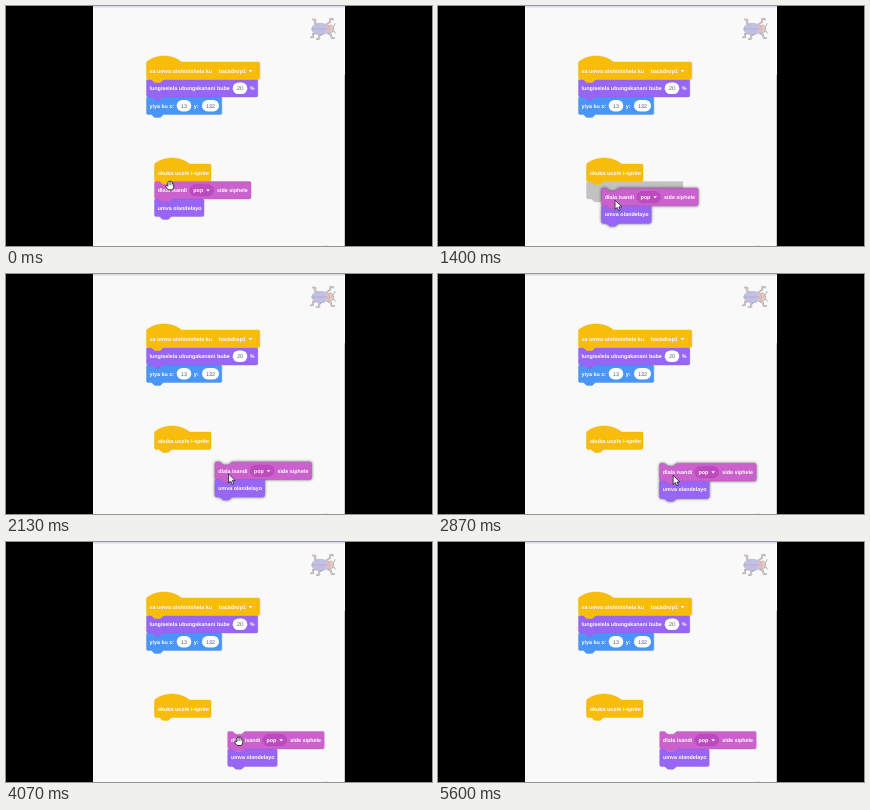
These frames come from a looping animation (426 by 240 pixels, 5670 ms). An HTML page:

```html
<!DOCTYPE html>
<html lang="xh">
<head>
<meta charset="utf-8">
<title>Block drag</title>
<style>
html, body { margin: 0; width: 100%; height: 100%; overflow: hidden; background: #000; }
svg { display: block; width: 100vw; height: 100vh; }
text { font: bold 5.4px "Liberation Sans", Arial, sans-serif; fill: #fff; text-rendering: geometricPrecision; }
.lift { filter: drop-shadow(0 0 1.8px rgba(0, 0, 0, .65)); }
</style>
</head>
<body>
<svg id="stage" viewBox="0 0 426 240">
  <defs>
    <pattern id="dots" x="87" width="14.6" height="14.6" patternUnits="userSpaceOnUse">
      <rect x="7" y="7" width="1" height="1" fill="#f1f1f1"/>
    </pattern>
  </defs>
  <rect width="426" height="240"/>
  <path d="M87 0H339V240H87Z" fill="#f9f9f9"/>
  <path d="M87 0H339V240H87Z" fill="url(#dots)"/>
  <path d="M87 .7H339" stroke="#d8daf0" stroke-width="1.4"/>
  <path d="M338.5 69V240" stroke="#cbcad4"/>
  <path d="M317 240q3-1.6 6 0" fill="#dcdce4"/>

  <g id="beetle" opacity=".6" stroke-linecap="round" stroke-linejoin="round">
    <g id="legs" fill="none">
      <path id="leg" d="M312 19l-3-2 .5-3-2.5-.5M321 18l3-2 .3-3 2.7.3M310 27l-3 1 .2 3-2.2.4M316 28l-3 2 .3 2.6-2.3.4M322 27.5l3 1.3.5 3 2.5.2" stroke="#77727f" stroke-width="1.9"/>
      <use href="#leg"/>
      <path d="M326 21l2.5-1.5.5-2M326 25l2.5.6.8 1.6" stroke="#77727f" stroke-width=".9"/>
    </g>
    <ellipse cx="324" cy="23" rx="3.6" ry="4" fill="#d9a58e" stroke="#777" stroke-width=".6"/>
    <ellipse cx="314.5" cy="23" rx="8.7" ry="5.6" fill="#a29bd9" stroke="#75719a" stroke-width=".7"/>
    <path d="M318.5 18.2q4.2 1 4.7 4.8t-4.7 4.8q2.3-4.8 0-9.6Z" fill="#c796b8"/>
    <path d="M306 23h15" stroke="#716a9c" stroke-width=".6"/>
  </g>

  <g id="blocks"></g>
  <g id="drag"></g>

  <g id="arrow">
    <path d="M0 0V9.2L2.2 7.3 3.7 10.6 5.2 9.9 3.8 6.8H6.6Z" fill="#fff" stroke="#111" stroke-width=".7"/>
  </g>
  <g id="open" fill="#fff" stroke="#111" stroke-width=".75" stroke-linejoin="round">
    <path d="M-2 4.5L-4.2 1.2Q-4.5-.2-3.2 0L-2.2 1V-3Q-1.5-4.2-.8-3V-4Q0-5.2.7-4V-3.3Q1.5-4.4 2.2-3.1V-1.8Q3.2-2.8 3.7-1.5V1.8L2.6 4.5Z"/>
    <path d="M-.8-3V0M.7-3.3V0M2.2-2V.2" fill="none" stroke-width=".45"/>
  </g>
  <g id="closed" fill="#fff" stroke="#111" stroke-width=".75" stroke-linejoin="round">
    <path d="M-2 4L-3.7 1.4Q-3.8 0-2.4-.1V-1.5Q-1.6-2.9-.8-1.9Q0-3.1.8-1.9Q1.6-2.7 2.3-1.5Q3.4-1.9 3.6-.6V1.7L2.5 4Z"/>
    <path d="M-.8-1.7V0M.8-1.7V0M2.3-1.2V.2" fill="none" stroke-width=".45"/>
  </g>
</svg>
<script>
const NS = "http://www.w3.org/2000/svg";
const LOOP = 5670, S = 0.365, ROW = 17.5;
const YELLOW = ["#f8bd0a", "#eab008"], PURPLE = ["#9866f6", "#8759e2"],
      BLUE = ["#4a95f5", "#4087de"], PINK = ["#cb61cd", "#bb52be"], GREY = ["#c2c2c2", "#c2c2c2"];
const $ = id => document.getElementById(id);

function add(parent, tag, attrs, content) {
  const el = document.createElementNS(NS, tag);
  for (const k in attrs) el.setAttribute(k, attrs[k]);
  if (content) el.textContent = content;
  parent.appendChild(el);
  return el;
}

// Outline in block units, scaled to the stage.
function block(parent, x, y, width, [fill, stroke], hat) {
  const w = width / S, h = ROW / S;
  const top = hat ? "M0 0c25-22 71-22 96 0"
    : "M0 4Q0 0 4 0H12c2 0 3 1 4 2l4 4c1 1 2 2 4 2h12c2 0 3-1 4-2l4-4c1-1 2-2 4-2";
  const d = `${top}H${w - 4}q4 0 4 4V${h - 4}q0 4-4 4H48c-2 0-3 1-4 2l-4 4c-1 1-2 2-4 2h-12c-2 0-3-1-4-2l-4-4c-1-1-2-2-4-2H4q-4 0-4-4Z`;
  return add(parent, "path", { d, fill, stroke, transform: `translate(${x} ${y}) scale(${S})` });
}

const label = (parent, x, y, s) => add(parent, "text", { x, y: y + 1.9 }, s);

const caret = (parent, x, y) =>
  add(parent, "path", { d: `M${x - 1.9} ${y - .9}h3.8l-1.9 2.1Z`, fill: "#fff" });

function number(parent, x, y, s, w) {
  add(parent, "rect", { x: x - w / 2, y: y - 5.8, width: w, height: 11.6, rx: 5.8, fill: "#fff" });
  add(parent, "text", { x, y: y + 1.9, "text-anchor": "middle", style: "fill:#575e75;font-weight:normal" }, s);
}

function buildStatic(g) {
  block(g, 140.5, 91, 75.3, BLUE);
  block(g, 140.5, 73.5, 111.3, PURPLE);
  block(g, 140.5, 56, 113.3, YELLOW, true);
  label(g, 143.5, 65, "xa umva utshintshela ku");
  add(g, "rect", { x: 209.5, y: 59.3, width: 41.5, height: 11.4, rx: 1.5, fill: "none", stroke: "#efb408", "stroke-width": .4 });
  label(g, 212.7, 65, "backdrop1");
  caret(g, 244.5, 65);
  label(g, 143.5, 82.3, "lungiselela ubungakanani bube");
  number(g, 234, 82.3, "20", 14.6);
  label(g, 243.8, 82.3, "%");
  label(g, 143.5, 99.7, "yiya ku x:");
  number(g, 178, 99.7, "13", 14.6);
  label(g, 187.7, 99.7, "y:");
  number(g, 204.5, 99.7, "132", 17);
  const gap = block(g, 148.5, 175.5, 96.5, GREY);
  block(g, 148.5, 158, 56.5, YELLOW, true);
  label(g, 151.7, 167, "okuba ucofe i-sprite");
  return gap;
}

function buildDrag(g) {
  block(g, 148.5, 193, 49.5, PURPLE);
  block(g, 148.5, 175.5, 96.5, PINK);
  label(g, 151.7, 184.2, "dlala isandi");
  add(g, "rect", { x: 183.7, y: 178.4, width: 23.8, height: 11.6, rx: 5.8, fill: "#bd4abf", stroke: "#b242b5", "stroke-width": .4 });
  label(g, 187.3, 184.2, "pop");
  caret(g, 202, 184.3);
  label(g, 211, 184.2, "side siphele");
  label(g, 151.7, 201.6, "umva olandelayo");
}

// Rows of [time, x, y]; straight runs between rows.
const DRAG = [[1200, 0, 0], [1400, 15, 6.8], [1600, 33, 9], [1800, 47, 11], [2130, 60.5, 12.5],
              [2400, 72, 13.7], [2600, 73, 13.9], [3000, 73.2, 13.9]];
const HAND = [[0, 164, 179.3], [400, 164, 179.3], [800, 160, 186], [1200, 160, 186],
              [3000, 235, 204], [3500, 233, 199], [4600, 233, 199]];

function at(track, t) {
  const n = track.findIndex(row => row[0] > t);
  if (n === 0) return track[0].slice(1);
  if (n < 0) return track[track.length - 1].slice(1);
  const a = track[n - 1], b = track[n], k = (t - a[0]) / (b[0] - a[0]);
  return [a[1] + (b[1] - a[1]) * k, a[2] + (b[2] - a[2]) * k];
}

const legs = $("legs").querySelector("use");
legs.replaceWith(Object.assign($("leg").cloneNode(), { id: "inner" }));
$("inner").setAttribute("stroke", "#dcb7a6");
$("inner").setAttribute("stroke-width", .8);

const gap = buildStatic($("blocks"));
buildDrag($("drag"));

function place(id, [x, y], on) {
  $(id).setAttribute("transform", `translate(${x} ${y})`);
  $(id).style.display = on ? "" : "none";
}

function draw(now) {
  const t = now % LOOP;
  const offset = at(DRAG, t), hand = at(HAND, t);
  const dragging = t >= 1230 && t < 3000;
  place("drag", offset, true);
  $("drag").classList.toggle("lift", dragging);
  gap.style.display = dragging && t < 1750 ? "" : "none";
  place("arrow", [offset[0] + 162, offset[1] + 187.3], dragging);
  place("closed", hand, t >= 800 && t < 1230);
  place("open", hand, t < 800 || (t >= 3000 && t < 4600));
}

function tick() {
  draw(performance.now());
  requestAnimationFrame(tick);
}
tick();
</script>
</body>
</html>
```
